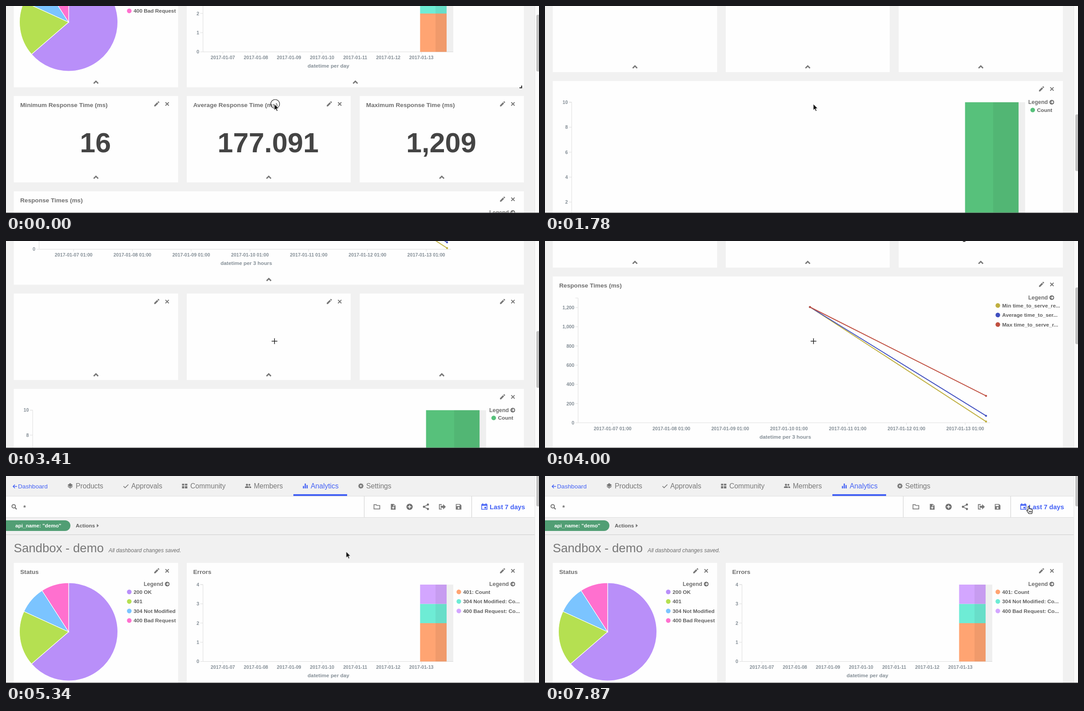
These frames come from a looping animation (1200 px wide and 467 px high, 8 s). An HTML page:

```html
<!DOCTYPE html>
<html lang="en">
<head>
<meta charset="utf-8">
<title>Analytics dashboard</title>
<style>
@property --y { syntax: "<number>"; inherits: true; initial-value: 315; }
@property --open { syntax: "<number>"; inherits: true; initial-value: 0; }
html, body { margin: 0; width: 100%; height: 100%; overflow: hidden; background: #f1f1f1; }
svg { display: block; width: 1200px; height: 467px; animation: scroll 8s infinite, open 8s step-end infinite; }
text { font: bold 13.65px "Liberation Sans", Arial, sans-serif; fill: #6e6e6e; white-space: pre; }
.nav { font-size: 15.7px; font-weight: normal; fill: #777; }
.back { font-weight: normal; fill: #4361f5; }
.bar { font-size: 14.6px; }
.key { font-size: 11.8px; fill: #5f5f5f; }
.head { font-size: 12.4px; }
.tick { font-size: 10.7px; fill: #848e96; }
.axis { font-size: 11.8px; fill: #848e96; }
.big { font-size: 63px; fill: #444; }
.h1 { font-size: 27.6px; font-weight: normal; fill: #777; }
.note { font-size: 12.2px; font-weight: normal; font-style: italic; }
.pill { font-size: 11.7px; fill: #fff; }
.mid { text-anchor: middle; }
.end { text-anchor: end; }
.blue { fill: #4361f5; }
.white { fill: #fff; }
.line { fill: none; stroke: #777; stroke-width: 2; }
.rule { fill: none; stroke: #ddd; }

#page { transform: translateY(calc(var(--y) * -1px)); }
#thumb { transform: translateY(calc(var(--y) * .2515px)); }
#dash { transform: translateY(calc(var(--open) * 225px)); }
#tools { transform: translateX(calc(var(--open) * -130px)); }
#picker, #refresh { opacity: var(--open); }
#grip { animation: grip 8s step-end infinite; }
#cursor { animation: move 8s infinite; }
#arrow { animation: arrow 8s step-end infinite; }
#cross { animation: cross 8s step-end infinite; }
#hand { animation: hand 8s step-end infinite; }
#ring { animation: ring 8s step-end infinite; }

/* One screen refresh is 1.85% of the loop. */
@keyframes scroll {
  0% { --y: 315; animation-timing-function: steps(2); }
  3.7% { --y: 345; animation-timing-function: steps(5); }
  12.95% { --y: 656; animation-timing-function: steps(7); }
  25.9% { --y: 1430; animation-timing-function: steps(2); }
  29.6% { --y: 1472; animation-timing-function: steps(2); }
  33.3% { --y: 1472; animation-timing-function: steps(3); }
  38.85% { --y: 1240; animation-timing-function: steps(6); }
  49.95% { --y: 653; animation-timing-function: steps(3); }
  55.5% { --y: 213; animation-timing-function: step-end; }
  57.35% { --y: 40; animation-timing-function: step-end; }
  59.2%, 100% { --y: 0; }
}
@keyframes open { 0%, 94.35%, 100% { --open: 0; } 75.85% { --open: 1; } }
@keyframes grip { 0% { opacity: 1; } 12.95%, 100% { opacity: 0; } }
@keyframes move {
  0%, 62.9% { transform: translate(604px, 221px); animation-timing-function: steps(6); }
  74%, 100% { transform: translate(1089px, 69px); }
}
@keyframes arrow { 0%, 66.6% { opacity: 1; } 37%, 74%, 100% { opacity: 0; } }
@keyframes cross { 0%, 66.6%, 100% { opacity: 0; } 37% { opacity: 1; } }
@keyframes hand { 0% { opacity: 0; } 74%, 100% { opacity: 1; } }
@keyframes ring { 0%, 74%, 92.5% { opacity: 1; } 1.85%, 77.7%, 96.2%, 100% { opacity: 0; } }
</style>
</head>
<body>
<svg id="stage" viewBox="0 0 1200 467" xmlns="http://www.w3.org/2000/svg"></svg>
<script>
const text = (x, y, s, cls = '') => `<text x="${x}" y="${y}" class="${cls}">${s}</text>`;
const rect = (x, y, w, h, fill, more = '') =>
  `<rect x="${x}" y="${y}" width="${w}" height="${h}" fill="${fill}" ${more}/>`;
const path = (d, more = 'class="line"') => `<path d="${d}" ${more}/>`;
const dot = (x, y, r, fill) => `<circle cx="${x}" cy="${y}" r="${r}" fill="${fill}"/>`;
const at = (x, y, body) => `<g transform="translate(${x} ${y})">${body}</g>`;
const solid = (d, fill = '#777') => path(d, `fill="${fill}" fill-rule="evenodd"`);
const range = n => [...Array(n).keys()];

const chevron = (x, y) => path(`M${x - 5} ${y + 2.7}l5 -5l5 5`, 'class="line" style="stroke-width:2.9"');

function panel(x, y, w, h, title = '') {
  const r = x + w;
  return rect(x, y, w, h, '#fefefe') +
    text(x + 14.5, y + 25, title) +
    at(r - 48.3, y + 18, solid('M-5.5 5.5v-2.6l6.6 -6.6l2.6 2.6l-6.6 6.6zM2 -4.6l1.2 -1.2q.6 -.4 1.2 0l1.4 1.4q.4 .6 0 1.2l-1.2 1.2z')) +
    path(`M${r - 28.5} ${y + 14.2}l7.6 7.6m0 -7.6l-7.6 7.6`) +
    chevron(x + w / 2, y + h - 11.5);
}

function legend(right, top, x, items) {
  return text(right - 78, top + 52.3, 'Legend', 'head') +
    at(right - 25, top + 47.8, dot(0, 0, 5.3, '#6e6e6e') +
      path('M-3 0h5M0 -2.8l2.8 2.8l-2.8 2.8', 'fill="none" stroke="#fff" stroke-width="1.6"')) +
    items.map(([name, fill], i) => {
      const y = top + 65.5 + 21.5 * i;
      return dot(x, y, 5.2, fill) + text(x + 9.8, y + 4.3, name, 'key');
    }).join('');
}

// Axes: labels run upwards from zero, dates run to the right from x.
function axes({ left, right, top, base, dy, labels, x, dx, suffix = '', title, mid }) {
  let out = path(`M${left - 6} ${top}H${left}V${base}M${left} ${base}H${right}`, 'class="rule"');
  labels.forEach((s, i) => {
    const y = base - dy * i;
    out += path(`M${left - 6} ${y}h6`, 'class="rule"') + text(left - 8.5, y + 3.8, s, 'tick end');
  });
  range(7).forEach(i => {
    const tx = x + dx * i;
    out += path(`M${tx} ${base}v5`, 'class="rule"') +
      text(tx, base + 16.7, `2017-01-${String(7 + i).padStart(2, '0')}${suffix}`, 'tick mid');
  });
  return out + text(mid, base + 35.5, title, 'axis mid');
}

function pie(cx, cy, r, slices) {
  const total = slices.reduce((n, s) => n + s[0], 0);
  const point = n => {
    const a = n / total * 2 * Math.PI;
    return `${cx + r * Math.sin(a)} ${cy - r * Math.cos(a)}`;
  };
  let sum = 0;
  return slices.map(([n, fill]) => {
    const from = point(sum);
    sum += n;
    return path(`M${cx} ${cy}L${from}A${r} ${r} 0 ${+(n > total / 2)} 1 ${point(sum)}Z`,
      `fill="${fill}" stroke="#fff" stroke-width="1.2"`);
  }).join('');
}

function nav() {
  const items = [[157, 'Products'], [282, 'Approvals'], [415, 'Community'], [558, 'Members'], [811, 'Settings']];
  const gear = range(4).map(i => `<path d="M0 -6V6" transform="rotate(${i * 45})" class="line" style="stroke-width:2.6"/>`).join('');
  return path('M0 45.5H1190', 'class="rule"') +
    path('M25 23.5H16.5M20 19.5l-4 4l4 4', 'fill="none" stroke="#4361f5" stroke-width="1.6"') +
    text(27, 27.5, 'Dashboard', 'back') +
    items.map(([x, s]) => text(x, 27.5, s, 'nav')).join('') +
    text(686, 27.5, 'Analytics', 'nav blue') +
    rect(647, 41, 121, 4, '#4361f5') +
    at(144.5, 22.5, solid('M-6 -2L0 -6.5L6 -2L0 2.5zM-6 1.2L-4.5 .2L0 3.6L4.5 .2L6 1.2L0 5.8z')) +
    path('M264.5 23l3.6 3.6l7.4 -7.4', 'class="line" style="stroke-width:1.6"') +
    at(402.3, 22.5, solid('M-6 -5h5v4h-5zM.5 -5h5.5v4h-5.5zM-6 .5h5v5h-5zM.5 .5h5.5v5h-5.5z')) +
    at(545, 22.5, dot(-2.5, -2.6, 2.4, '#777') + dot(3, -2.6, 2.1, '#777') +
      solid('M-7 4.5v-1.5q0 -2.4 4.5 -2.4t4.5 2.4v1.5zM3 4.5v-1.5q0 -1.4 -.8 -2.2q4.8 -.2 4.8 2.2v1.5z')) +
    at(674, 22.5, solid('M-5.5 0h2.6v5.5h-2.6zM-1.5 -5.5h2.6v11h-2.6zM2.6 -2h2.6v7.5h-2.6z', '#4361f5')) +
    at(799, 22.5, gear + dot(0, 0, 4.4, '#777') + dot(0, 0, 2, '#f1f1f1'));
}

function search() {
  const icons = [
    path('M-6.5 4.8V-4.8H-1.5L0 -3H6.5V4.8z', 'class="line" style="stroke-width:1.7"'),
    solid('M-5.3 -6.5H1.3L5.3 -2.5V6.5H-5.3zM.5 -5.3V-1.8H4zM-.8 -.8V1.2H-2.8V2.8H-.8V4.8H.8V2.8H2.8V1.2H.8V-.8z'),
    dot(0, 0, 7, '#6e6e6e') + path('M-4 0h8M0 -4v8', 'stroke="#fff" stroke-width="1.8"'),
    path('M4.5 -5L-4.5 0L4.5 5', 'class="line" style="stroke-width:1.6"') +
      dot(4.5, -5, 2.4, '#6e6e6e') + dot(-4.5, 0, 2.4, '#6e6e6e') + dot(4.5, 5, 2.4, '#6e6e6e'),
    path('M-1 -5H-6.5V5H-1', 'class="line" style="stroke-width:1.8"') +
      solid('M-3.5 -2.3H2V-6L8 0L2 6V2.3H-3.5z'),
    solid('M-6.3 -6.3H3.3L6.3 -3.3V6.3H-6.3zM-4.6 -4.8V-1.5H2.4V-4.8zM0 .5a2.1 2.1 0 1 0 .01 0z')
  ];
  return rect(0, 46, 1190, 47, '#fefefe') + path('M0 93.5H1190', 'class="rule"') +
    `<circle cx="17.3" cy="68.3" r="3.9" class="line"/>` + path('M20 71.2l4 4', 'class="line" style="stroke-width:2.4"') +
    text(39, 75.5, '*', 'bar') +
    `<g id="tools">${path('M806.5 46V93M1048.5 46V93', 'class="rule" style="stroke:#ccc"')}` +
    icons.map((body, i) => at(835 + 36.8 * i, 69.5, body)).join('') + '</g>' +
    `<g id="refresh">${path('M953 66a5.4 5.4 0 1 0 1.2 5.2')}` +
    solid('M955.5 62.8v6.2h-6.2z') + text(961, 75, 'Auto-refresh', 'bar') + '</g>' +
    at(1077, 69, solid('M-6.8 -5.5H-4.5V-7.5H-2.8V-5.5H2.8V-7.5H4.5V-5.5H6.8V7H-6.8zM-5.2 -2V5.4H5.2V-2zM.2 .5H4V4.2H.2z', '#4361f5')) +
    text(1089, 75, 'Last 7 days', 'bar blue');
}

function picker() {
  const cols = [
    [245, 'Today,This week,This month,The day so far,Week to date,Month to date'],
    [366, 'Yesterday,Day before yesterday,This day last week,Previous week,Previous month'],
    [533.5, 'Last 15 minutes,Last 30 minutes,Last 1 hour,Last 4 hours,Last 12 hours,Last 24 hours,Last 7 days'],
    [666, 'Last 30 days,Last 60 days,Last 90 days']
  ];
  return `<g id="picker">${rect(0, 94, 1190, 224, '#e7e7e7')}` +
    path('M0 318.5H1190', 'class="rule"') +
    rect(13, 133, 168.5, 39, '#4a67fb', 'rx="3"') +
    text(27, 157.3, 'Quick', 'white') + text(27, 198.3, 'Relative') + text(27, 239.3, 'Absolute') +
    cols.map(([x, list]) => list.split(',').map((s, i) => text(x, 167 + 19.55 * i, s)).join('')).join('') +
    chevron(591.5, 309) + '</g>';
}

function dashboard() {
  const third = [[17.5, 370], [407, 369], [796.3, 369.7]];
  const metrics = [['Minimum', '16'], ['Average', '177.091'], ['Maximum', '1,209']];
  const orange = '#ffa472', teal = '#6eecd5', lilac = '#d3a6ff', leaf = '#57c17b';
  const shade = (x, y, w, h) => rect(x, y, w, h, '#000', 'opacity=".06"');
  const series = [
    ['Min time_to_serve_re...', '#bfaf40', 1060.3],
    ['Average time_to_ser...', '#404fbf', 1047.4],
    ['Max time_to_serve_r...', '#bf4f40', 1002.4]
  ];
  const codes = [[7, '#b98ff9', '200 OK'], [2, '#b5e051', '401'], [1, '#7bc4ff', '304 Not Modified'], [1, '#ff70cf', '400 Bad Request']];

  return rect(-12, 100, 157, 24, '#519e74', 'rx="12"') +
    text(21, 116.3, 'api_name: "demo"', 'pill') +
    text(157, 116.3, 'Actions', 'key') + solid('M204.5 108l4.5 4l-4.5 4z') +
    path('M0 132.5H1190', 'class="rule" style="stroke:#ccc"') +
    text(17.5, 172, 'Sandbox - demo', 'h1') +
    text(231, 172, 'All dashboard changes saved.', 'note') +

    panel(17.5, 196, 370, 302.5, 'Status') +
    pie(141, 351.5, 110.6, codes) +
    legend(388, 196, 277.5, codes.map(c => [c[2], c[1]])) +

    panel(407, 196, 759, 302.5, 'Errors') +
    axes({ left: 443.5, right: 1007, top: 245, base: 418.5, dy: 43.4, labels: range(5), x: 488.2, dx: 74.5, title: 'datetime per day', mid: 726 }) +
    rect(932.3, 332, 59.7, 86.5, orange) + rect(932.3, 288.5, 59.7, 43.5, teal) + rect(932.3, 245, 59.7, 43.5, lilac) +
    shade(967, 245, 40, 173.5) +
    legend(1166, 196, 1019.5, [['401: Count', orange], ['304 Not Modified: Co...', teal], ['400 Bad Request: Co...', lilac]]) +
    path('M1161 494.5v5h-5', 'id="grip" fill="none" stroke="#222" stroke-width="2"') +

    third.map(([x, w], i) => panel(x, 518, w, 195, `${metrics[i][0]} Response Time (ms)`) +
      text(x + w / 2 - 1.3, 645, metrics[i][1], 'big mid')).join('') +

    panel(17.5, 733, 1148.5, 410, 'Response Times (ms)') +
    axes({ left: 74.5, right: 1002, top: 781.7, base: 1063, dy: 43.3, labels: range(7).map(i => (i * 200).toLocaleString('en-US')), x: 152.3, dx: 132.3, suffix: ' 01:00', title: 'datetime per 3 hours', mid: 541 }) +
    series.map(([, c, y]) => path(`M596.5 802L993 ${y}`, `stroke="${c}" stroke-width="2"`) +
      dot(596.5, 802, 2.2, c) + dot(993, y, 2.2, c)).join('') +
    legend(1166, 733, 1019.5, series) +

    third.map(([x, w]) => panel(x, 1163, w, 195)).join('') +

    panel(17.5, 1378, 1148.5, 410) +
    axes({ left: 60, right: 1081, top: 1426, base: 1707.5, dy: 56.3, labels: range(6).map(i => i * 2), x: 139.5, dx: 135.3, title: 'datetime per day', mid: 571 }) +
    rect(540, 1679.3, 120.3, 28.2, leaf) + rect(945.7, 1426, 120.5, 281.5, leaf) +
    shade(1009, 1426, 72, 281.5) +
    legend(1166, 1378, 1098, [['Count', leaf]]);
}

function cursor() {
  const ink = 'fill="#111" stroke="#fff" stroke-width="1"';
  return '<g id="cursor">' +
    `<circle id="ring" cx="2" cy="0" r="10" fill="none" stroke="#222" stroke-width="1.2"/>` +
    path('M0 0V14.2L3.3 11.2L5.6 16.4L8 15.3L5.7 10.3H10z', `id="arrow" ${ink}`) +
    path('M-6 5h13M.5 -1.5v13', 'id="cross" stroke="#222" stroke-width="1.6"') +
    path('M-1.6 9V.8Q-1.6 -.8 -.2 -.8T1.2 .8V5.2Q2.6 4 3.7 5.5Q5.2 4.6 6 6.2Q8 5.6 8.3 7.6V11Q8 13.5 7 15.8H0Q-1 13.4 -4.2 9.6Q-5 8 -3.6 7.6Q-2.6 7.5 -1.6 9zM1.2 9.5v3.5M3.4 9.5v3.5M5.6 9.5v3.5',
      'id="hand" fill="#fff" stroke="#222" stroke-width="1.3" stroke-linejoin="round"') + '</g>';
}

document.getElementById('stage').innerHTML =
  rect(0, 0, 1200, 467, '#f1f1f1') +
  `<g id="page">${nav()}${search()}${picker()}<g id="dash">${dashboard()}</g></g>` +
  rect(1190, 0, 10, 467, '#fafafa') + path('M1190.5 0V467', 'class="rule" style="stroke:#e6e6e6"') +
  rect(1194, -59.5, 8, 128, '#c1c1c1', 'rx="3.5" id="thumb"') +
  rect(0, 466, 1200, 1, '#5c5c5c') + cursor();
</script>
</body>
</html>
```
